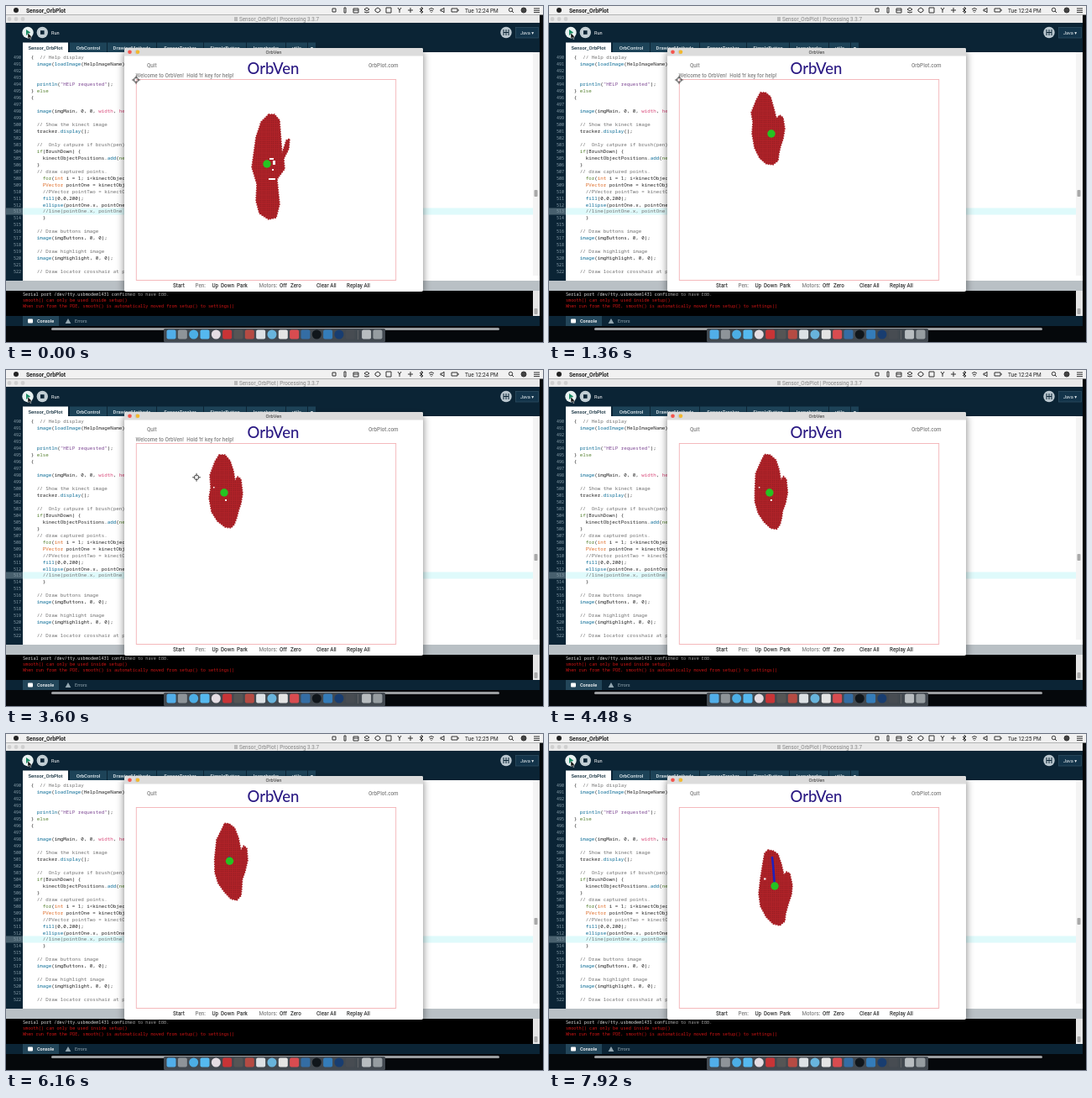
Animation of 640x400 px, one loop 8 s. Source, as an HTML page:

```html
<!DOCTYPE html>
<html lang="en">
<head>
<meta charset="utf-8">
<title>Hand tracking sketch</title>
<style>
  html, body { margin: 0; width: 100%; height: 100%; overflow: hidden; background: #05080b; }
  svg { display: block; width: 640px; height: 400px; }
  text { white-space: pre; font-family: Roboto, sans-serif; }
  .mono text { font-family: "Noto Sans Mono", "DejaVu Sans Mono", monospace; }
  .code text { font-size: 5.83px; fill: #222; }
  .console text { font-size: 5.2px; }
  .nums text { font-size: 5px; fill: #8ba0ab; text-anchor: end; }
  .tabs text { font-size: 5.9px; font-weight: 500; fill: #e4edf1; }
  .app text { font-size: 6.3px; font-weight: 500; fill: #333; }
  .app .dim { fill: #858585; }
</style>
</head>
<body>
<svg id="stage" viewBox="0 0 640 400">
  <defs>
    <pattern id="grain" width="2.5" height="2.5" patternUnits="userSpaceOnUse">
      <rect width="2.5" height="2.5" fill="#b02228"/>
      <circle cx="1.25" cy="1.25" r=".65" fill="#861a20"/>
    </pattern>
    <filter id="shadow" x="-10%" y="-10%" width="120%" height="125%">
      <feDropShadow dx="0" dy="4" stdDeviation="5" flood-color="#000" flood-opacity=".5"/>
    </filter>
  </defs>

  <rect width="640" height="400" fill="#05080b"/>

  <g id="menu">
    <rect width="640" height="10.5" fill="#f1f1f1"/>
    <circle cx="12" cy="5" r="3" fill="#222"/>
    <text x="24" y="7.6" font-size="6.7" font-weight="700" fill="#222">Sensor_OrbPlot</text>
    <text id="clock" x="547" y="7.5" font-size="6.5" fill="#222"></text>
    <g id="status" fill="none" stroke="#333" stroke-width="1"></g>
  </g>

  <g id="editor">
    <rect y="10.5" width="636" height="10" fill="#e9e9e9"/>
    <g fill="#d0d0d0"><circle cx="4" cy="15.5" r="2.4"/><circle cx="12" cy="15.5" r="2.4"/><circle cx="20" cy="15.5" r="2.4"/></g>
    <rect x="272" y="13" width="4" height="5" fill="#bbb"/>
    <text x="278" y="17.8" font-size="6.3" fill="#888">Sensor_OrbPlot | Processing 3.3.7</text>
    <rect y="20" width="636" height="361" fill="#0b2435"/>
    <circle cx="26" cy="31.5" r="6.7" fill="#e8f1f1"/>
    <path d="M24 28v7l5-3.5z" fill="#168a61"/>
    <path d="M26 32v7l1.8-1.6 1.2 2.4 1-.5-1.1-2.4h2.1z" fill="#111" stroke="#fff" stroke-width=".4"/>
    <circle cx="43.3" cy="31.5" r="6.7" fill="#c2ced4"/>
    <rect x="41" y="29.2" width="4.6" height="4.6" fill="#0b2435"/>
    <text x="54" y="33.6" font-size="5.6" fill="#fff">Run</text>
    <circle cx="596" cy="31.5" r="6.7" fill="#b9c6ce"/>
    <path d="M593 28v7m0-3.5h6m0-3.5v7M596 28v7" stroke="#0b2435" fill="none"/>
    <rect x="607.5" y="25.5" width="27" height="12.5" fill="#13344a" stroke="#315064" stroke-width=".7"/>
    <text x="613" y="33.6" font-size="5.6" fill="#e8eef1">Java ▾</text>
    <g id="tabs" class="tabs"></g>
    <rect x="20" y="55" width="608" height="266" fill="#fff"/>
    <rect x="628" y="55" width="8" height="266" fill="#f4f4f4"/>
    <rect x="629.5" y="219" width="4" height="8" rx="1" fill="#a9a9a9"/>
    <rect x="20" y="240.5" width="608" height="8" fill="#dffafb"/>
    <rect y="240.5" width="20" height="8" fill="#48606e"/>
    <g id="nums" class="mono nums"></g>
    <g id="code" class="mono code"></g>
    <rect y="321" width="636" height="6" fill="#fff"/>
    <rect y="321" width="20" height="6" fill="#0b2435"/>
    <rect y="327" width="636" height="12" fill="#b9c0c5"/>
    <rect y="339" width="636" height="30" fill="#000"/>
    <g class="mono console">
      <text x="20" y="345.4" fill="#ddd">Serial port /dev/tty.usbmodem1431 confirmed to have EBB.</text>
      <text x="20" y="352.4" fill="#d01414">smooth() can only be used inside setup()</text>
      <text x="20" y="359.4" fill="#d01414">When run from the PDE, smooth() is automatically moved from setup() to settings()</text>
    </g>
    <rect x="628" y="339" width="8" height="30" fill="#e5e5e5"/>
    <rect x="629.5" y="360" width="4" height="7" rx="1" fill="#aaa"/>
    <rect x="20" y="369" width="43" height="12" fill="#23465a"/>
    <rect x="26" y="372.5" width="6" height="5" rx="1" fill="#fff"/>
    <text x="37" y="377.2" font-size="5.5" font-weight="500" fill="#fff">Console</text>
    <path d="M74 372l3.4 6h-6.8z" fill="#93a6b0"/>
    <text x="82" y="377.2" font-size="5.5" fill="#93a6b0">Errors</text>
  </g>

  <rect x="54" y="383" width="534" height="3" rx="1.5" fill="#9a9da0"/>
  <rect x="188" y="384" width="264" height="16" rx="1.5" fill="#424950"/>
  <g id="dock"></g>

  <g id="app" class="app">
    <rect x="141" y="50" width="356" height="290" rx="2" fill="#fff" filter="url(#shadow)"/>
    <path d="M141 59.5V52q0-2 2-2h352q2 0 2 2v7.5z" fill="#dcdcdc"/>
    <circle cx="147.5" cy="54.8" r="2.3" fill="#f4544d"/>
    <circle cx="156" cy="54.8" r="2.3" fill="#cfcfcf" stroke="#bbb" stroke-width=".4"/>
    <circle cx="157" cy="54.8" r="2.3" fill="#f2b92f"/>
    <text x="319" y="57" text-anchor="middle" style="font-size:5.8px;font-weight:400">OrbVen</text>
    <text x="318.5" y="81" text-anchor="middle" style="font:500 18.5px Lato,sans-serif;fill:#2c1b84">OrbVen</text>
    <rect x="155.3" y="87.5" width="309.4" height="239" fill="none" stroke="#f3b2b6" stroke-width=".9"/>
    <g id="labels"></g>
    <text id="welcome" class="dim" x="154.5" y="84.8">Welcome to OrbVen!  Hold 'h' key for help!</text>
  </g>

  <g id="cross" fill="none" stroke="#444" stroke-width=".9">
    <circle r="2.8"/><path d="M-5 0h3.6M1.4 0H5M0-5v3.6M0 1.4V5"/>
  </g>
  <path id="hand" fill="url(#grain)" stroke="#a82026" stroke-width="1.6" stroke-dasharray="1.6 1.3" stroke-linejoin="round"/>
  <path id="holes" fill="#fff"/>
  <polyline id="trail" fill="none" stroke="#1f20bd" stroke-width="2.6" stroke-linecap="round" stroke-linejoin="round"/>
  <circle id="dot" r="4.7" fill="#25c321"/>
</svg>

<script>
const LOOP = 8000, STEP = 80;
const $ = id => document.getElementById(id);
const fill = (id, items, draw) => { $(id).innerHTML = items.map(draw).join(''); };
const esc = s => s.replace(/&/g, '&amp;').replace(/</g, '&lt;');
const lerp = (a, b, k) => a + (b - a) * k;

// Editor text
const source = `  {  // Help display
    image(loadImage(HelpImageName), 0, 0);


    println("HELP requested");
  } else
  {

    image(imgMain, 0, 0, width, height);

    // Show the kinect image
    tracker.display();

    //  Only catpure if brush(pen) is
    if(BrushDown) {
      kinectObjectPositions.add(new
    }
    // draw captured points.
      for(int i = 1; i<kinectObjec
      PVector pointOne = kinectObj
      //PVector pointTwo = kinectO
      fill(0,0,200);
      ellipse(pointOne.x, pointOne
      //line(pointOne.x, pointOne
      }

    // Draw buttons image
    image(imgButtons, 0, 0);

    // Draw highlight image
    image(imgHighlight, 0, 0);

    // Draw locator crosshair at p`.split('\n');

const rules = [
  [/^\/\//, '#707070'], [/^"/, '#7d4793'],
  [/^(if|for|else|new)$/, '#55802f'], [/^(int|PVector)$/, '#dd6a25'],
  [/^(width|height)$/, '#d94a7a'],
  [/^(image|loadImage|println|fill|ellipse|display|add)$/, '#0b6c96']
];
const paint = line => line.replace(/\/\/.*|"[^"]*"|\w+|[^\w"\/]+/g, part => {
  const rule = rules.find(([test]) => test.test(part));
  return rule ? `<tspan fill="${rule[1]}">${esc(part)}</tspan>` : esc(part);
});
const lineY = i => 63.4 + i * 7.96;
fill('code', source, (line, i) => `<text x="22.8" y="${lineY(i)}">${paint(line)}</text>`);
fill('nums', source, (_, i) => `<text x="18" y="${lineY(i)}">${490 + i}</text>`);

const tabs = [[20, 54, 'Sensor_OrbPlot'], [76, 44, 'OrbControl'], [121, 58, 'DrawingMethods'],
  [180, 55, 'SensorTracker'], [236, 50, 'SimpleButton'], [287, 46, 'loopchecks'],
  [334, 25, 'utils'], [360, 9, '▾']];
fill('tabs', tabs, ([x, w, name], i) =>
  `<rect x="${x}" y="43.5" width="${w}" height="11.5" fill="${i ? '#1d4358' : '#fff'}"/>
   <text x="${x + w / 2}" y="51.5" text-anchor="middle"${i ? '' : ' style="fill:#14303f"'}>${name}</text>`);

const labels = [[168, 73, 'Quit', 1], [432, 73, 'OrbPlot.com', 1], [199, 334.5, 'Start'],
  [225.5, 334.5, 'Pen:', 1], [245.5, 334.5, 'Up'], [256, 334.5, 'Down'], [275, 334.5, 'Park'],
  [301.5, 334.5, 'Motors:', 1], [326, 334.5, 'Off'], [339, 334.5, 'Zero'],
  [370, 334.5, 'Clear All'], [406, 334.5, 'Replay All']];
fill('labels', labels, ([x, y, name, dim]) => `<text x="${x}" y="${y}"${dim ? ' class="dim"' : ''}>${name}</text>`);

// Menu symbols and dock
const signs = ['M-2-2h4v4h-4z', 'M-1-3h2v6h-2z', 'M-3-2h6v5h-6zM-3 0h6', 'M-3-1l3-2 3 2-3 2zM-3 2l3 1 3-1',
  'M0-3l3 2v2l-3 2-3-2v-2z', 'M-3-3h6v6h-6z', 'M-2-3l2 3 2-3M0 0v3', 'M-3 0h6M0-3v6', 'M-2-2l4 4-2 1.5v-7l2 1.5-4 4',
  'M-3-1q3-3 6 0M-2 1q2-2 4 0M0 2v1', 'M-3-1h2l2-2v6l-2-2h-2z', 'M-4-2h7v4h-7zM4-1v2'];
const signX = i => i < 9 ? 391 + i * 13 : 507 + (i - 9) * 14;
fill('status', signs, (d, i) => `<path d="${d}" transform="translate(${signX(i)} 5)"/>`);
$('status').innerHTML += '<circle cx="601.5" cy="4.5" r="2.2"/><path d="M603 6l2 2M629 3h7M629 5.3h7M629 7.6h7"/><circle cx="617" cy="5" r="3" fill="#444"/>';

const icons = '#51aee9 #8e9499 #4caee5 #55b9ef #e5dde3 #c83436 #555 #b54b43 #dce1e5 #68b4dc #e4e4e4 #d94c50 #346da4 #10161b #347cb9 #183d70 #474c52 #b8bdc0 #969da1'.split(' ');
const round = new Set([2, 4, 9, 13, 15]);
fill('dock', icons, (color, i) => {
  const x = 197 + i * 13.33 + (i > 16 ? 6 : 0);
  return `<rect x="${x - 5.5}" y="385.5" width="11" height="11" rx="${round.has(i) ? 5.5 : 2}" fill="${color}"/>`;
});
$('dock').innerHTML += '<path d="M419.5 386v11" stroke="#777" stroke-width=".6"/>';

// Hand outlines run clockwise from the fingertip; holes are x, y, w, h
const pose = (time, dot, outline, holes = []) => ({ time, dot, holes, outline: outline.split(' ').map(p => p.split(',').map(Number)) });
const open = pose(0, [311, 188], '313,129 320,129 326,136 328,163 329,176 334,160 338,158 337,170 331,182 332,194 323,206 326,236 322,252 313,254 302,247 298,232 299,212 293,192 298,156 304,138',
  [[314, 181, 5, 2], [318, 184, 3, 5], [313, 205, 8, 2], [317, 194, 2, 2]]);
const near = pose(1360, [265, 152], '252,103 258,103 264,108 268,122 271,134 275,130 279,133 281,146 279,158 276,167 274,176 273,184 267,189 259,188 251,181 245,169 242,152 243,138 241,127 247,112');
const left = pose(2640, [257, 146], '248,102 256,103 262,108 265,118 268,132 271,127 275,131 278,145 275,157 273,167 271,176 269,182 264,187 257,186 248,178 241,165 239,150 241,140 239,128 244,110',
  [[245.5, 134, 3, 3], [247, 122, 1.4, 1.4]]);
const back = pose(3600, [260, 146], '254,101 261,101 267,108 271,120 273,132 276,127 280,130 282,147 280,159 277,168 275,176 272,184 268,188 261,187 252,180 245,169 242,152 244,140 243,125 249,109',
  [[261, 154, 2, 2], [247, 139, 1.5, 1.5]]);
const wide = pose(5440, [266, 146], '260,100 266,101 274,106 278,118 280,131 283,126 286,130 287,145 284,158 280,168 280,176 279,184 275,191 268,190 261,182 254,172 249,162 247,148 250,121 257,108',
  [[254, 130, 4, 3]]);
const draw = pose(6800, [267, 156], '261,112 266,112 271,117 276,128 280,145 284,139 288,142 289,155 286,168 283,178 282,188 281,200 275,204 268,202 260,194 252,183 249,168 250,150 252,130 257,119');
const low = pose(7920, [269, 181], '261,138 267,139 273,143 277,155 280,168 283,164 287,166 290,180 289,191 285,203 282,214 281,223 275,228 267,226 259,218 252,205 250,190 252,172 255,153 257,142',
  [[256, 171.5, 2.5, 2]]);
const poses = [open, near, left, back, wide, draw, low];

const box = ([x, y, w, h]) => `M${x} ${y}h${w}v${h}h${-w}z`;
const mix = (p, q, k) => [lerp(p[0], q[0], k), lerp(p[1], q[1], k)];

function render(t) {
  let i = 0;
  while (i < poses.length - 2 && t >= poses[i + 1].time) i++;
  const a = poses[i], b = poses[i + 1];
  const k = (t - a.time) / (b.time - a.time);
  const dot = mix(a.dot, b.dot, k);

  $('hand').setAttribute('d', 'M' + a.outline.map((p, n) => mix(p, b.outline[n], k)).join('L') + 'Z');

  const closest = k < .5 ? a : b;
  $('holes').setAttribute('d', closest.holes.map(box).join(''));
  $('holes').setAttribute('transform', `translate(${dot[0] - closest.dot[0]} ${dot[1] - closest.dot[1]})`);

  $('dot').setAttribute('cx', dot[0]);
  $('dot').setAttribute('cy', dot[1]);

  const path = [[266, 147]];
  if (t > draw.time) path.push(draw.dot);
  $('trail').setAttribute('points', t > 5600 ? [...path, dot].join(' ') : '');

  const travel = Math.min(1, Math.max(0, (t - 2272) / 1935));
  $('cross').setAttribute('transform', `translate(${mix([155, 88], [260, 146], travel)})`);
  $('cross').style.display = travel < 1 ? '' : 'none';
  $('welcome').style.display = t < 4480 ? '' : 'none';
  $('clock').textContent = t < 4880 ? 'Tue 12:24 PM' : 'Tue 12:25 PM';
}

function tick() {
  const t = performance.now() % LOOP;
  render(Math.floor(t / STEP) * STEP);
  requestAnimationFrame(tick);
}
tick();
</script>
</body>
</html>
```
